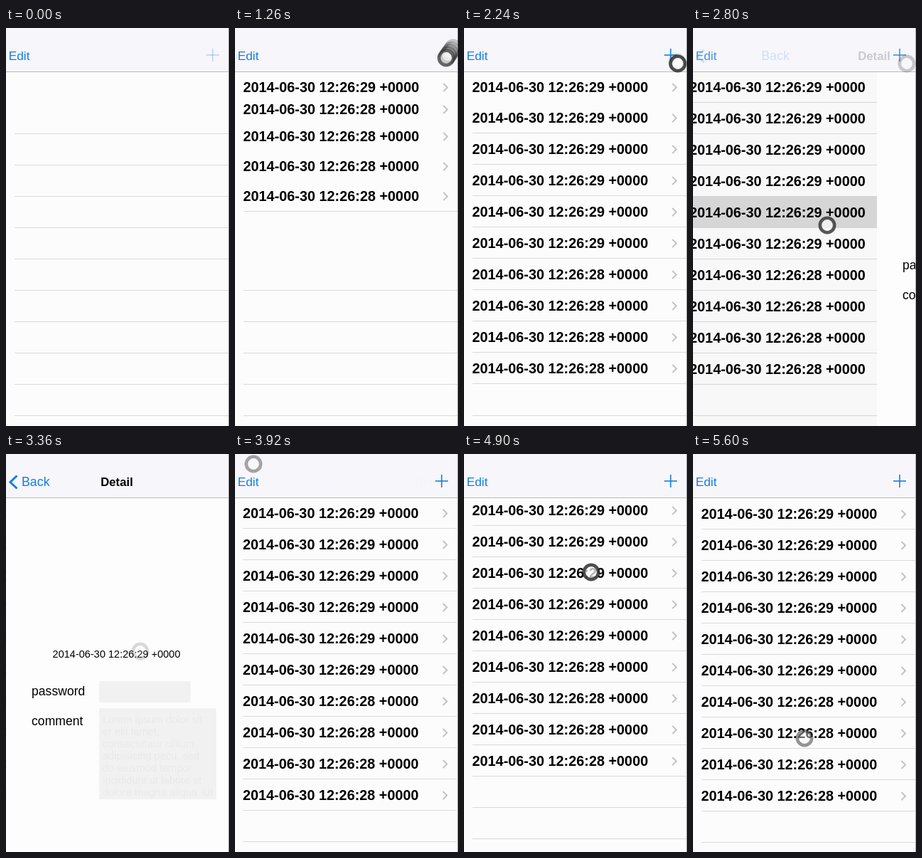
These frames come from a looping animation (314x559 px, 5.74 s). An HTML page with a canvas:

```html
<!DOCTYPE html>
<html lang="en">
<head>
<meta charset="utf-8">
<title>List and detail</title>
<style>
html, body { margin: 0; width: 100%; height: 100%; overflow: hidden; background: #fcfcfc; }
canvas { display: block; width: 314px; height: 559px; }
</style>
</head>
<body>
<canvas id="stage"></canvas>
<script>
const W = 314, H = 559, LOOP = 5740, STEP = 140;
const TOP = 61, ROW = 44, PICKED = 4;
const PUSH = 2760, POP = 3540, GRAB = 4340, DROP = 5300;
const BLUE = '#147ee0', PAPER = '#fcfcfc', BAR = '#f7f6fb', RULE = '#d9d9db';
const FONT = '"Liberation Sans", Arial, sans-serif';
const LOREM = ['Lorem ipsum dolor sit', 'er elit lamet,', 'consectetaur cillium',
  'adipisicing pecu, sed', 'do eiusmod tempor', 'incididunt ut labore et', 'dolore magna aliqua. Ut'];

const canvas = document.getElementById('stage');
const c = canvas.getContext('2d');
const dpr = window.devicePixelRatio || 1;
canvas.width = W * dpr;
canvas.height = H * dpr;

const clamp = v => Math.max(0, Math.min(1, v));
const mix = (a, b, p) => a + (b - a) * p;
const smooth = p => p * p * (3 - 2 * p);
const span = (t, a, b) => smooth(clamp((t - a) / (b - a)));
const spring = dt => dt <= 0 ? 0 : 1 - (1 + dt / 53) * Math.exp(-dt / 53);
const slide = dt => dt <= 0 ? 0 : dt > 600 ? 1 : 1 - Math.exp(-dt / 125);
const stamp = sec => `2014-06-30 12:26:${sec} +0000`;

// Ten quick taps on the plus button, each inserting one row.
const taps = Array.from({ length: 10 }, (_, i) => ({
  down: 690 + 105 * i + (i > 4 ? 60 : 0),
  x: i < 5 ? 307 - 2.4 * i : mix(297.4, 301, (i - 4) / 5),
  y: i < 5 ? 28 + 3.5 * i : mix(42, 50, (i - 4) / 5)
}));
taps.forEach((tap, i) => { tap.up = i < 9 ? tap.down + 40 : 2260; });

const touches = [
  ...taps,
  { x: 189, y: 277, down: 2600, up: PUSH },
  { x: 26, y: 14, down: 3440, up: POP }
];

function finger(t) {
  const up = span(t, 4460, 4900), down = span(t, 4940, DROP);
  return {
    x: 183 - 4 * up - 22 * down,
    y: 262.6 - 96.6 * up + 233 * down,
    down: GRAB, up: DROP
  };
}

function scrollAt(t) {
  if (t < GRAB) return 0;
  if (t > DROP) return Math.round(1 + 64 * Math.exp((DROP - t) / 45));
  const pull = 0.55 * (finger(t).y - 262.6);
  return Math.round(pull / (1 + Math.abs(pull) / 497));
}

function rect(x, y, w, h, color) {
  c.fillStyle = color;
  c.fillRect(x, y, w, h);
}

function text(str, x, y, size, color = '#000', weight = 'normal', align = 'left') {
  c.font = `${weight} ${size}px ${FONT}`;
  c.textAlign = align;
  c.fillStyle = color;
  c.fillText(str, x, y);
}

function stroke(points, color, width) {
  c.beginPath();
  points.forEach(([x, y], i) => i ? c.lineTo(x, y) : c.moveTo(x, y));
  c.strokeStyle = color;
  c.lineWidth = width;
  c.stroke();
}

function faded(alpha, draw) {
  if (alpha < 0.004) return;
  c.save();
  c.globalAlpha *= alpha;
  draw();
  c.restore();
}

function drawRow(y, sec, glow) {
  rect(0, y, W, ROW, PAPER);
  faded(glow, () => rect(0, y, W, ROW, '#d9d9d9'));
  rect(12, y + ROW - 1, W - 12, 1, RULE);
  text(stamp(sec), 11.5, y + 29, 19.85, '#000', 'bold');
  stroke([[293.5, y + 17], [299, y + 22.5], [293.5, y + 28]], '#c3c3c8', 2);
}

function drawList(t) {
  const count = taps.filter(tap => tap.down <= t).length;
  const moving = count && t - taps[count - 1].down < 420;
  const base = TOP + scrollAt(t);
  const glow = t < 2680 ? 0 : 1 - spring(t - POP);

  rect(0, 0, W, H, PAPER);
  for (let i = count + (moving || !count ? 1 : 0); i < 14; i++) {
    rect(12, base + ROW * (i + 1) - 1, W - 12, 1, RULE);
  }
  // Older rows slide down on top of the newer ones.
  let y = base;
  for (let i = count - 1; i >= 0; i--) {
    const picked = count === 10 && i === 9 - PICKED;
    drawRow(Math.round(y), i < 4 ? 28 : 29, picked ? glow : 0);
    y += ROW * slide(t - taps[i].down);
  }
}

function drawDetail() {
  rect(0, 0, W, H, '#fdfdfd');
  text(stamp(29), 155.5, 286, 14.55, '#000', 'normal', 'center');
  text('password', 36, 339, 17.6);
  text('comment', 36, 381, 17.6);
  rect(131, 319, 129, 30, '#f1f1f1');
  rect(131, 357, 165, 128, '#f1f1f1');
  LOREM.forEach((line, i) => text(line, 136, 378 + 17 * i, 14.7, '#e9e9e9'));
}

function drawBar(t, p) {
  rect(0, 0, W, TOP, BAR);
  rect(0, TOP, W, 1, '#b9b9bd');
  faded(1 - p, () => {
    text('Edit', 3.7, 45, 17.3, BLUE);
    faded(t < 690 ? 0.28 : t < 1760 ? 0.1 : 1, () => {
      stroke([[282, 38], [300, 38]], BLUE, 1.6);
      stroke([[291, 29], [291, 47]], BLUE, 1.6);
    });
  });
  faded(p, () => {
    stroke([[15.5, 30.5], [6, 39.5], [15.5, 48.5]], BLUE, 3);
    text('Back', 22 + 90 * (1 - p), 45, 17.8, BLUE);
    text('Detail', 156 + 120 * (1 - p), 45, 16.8, '#000', 'bold', 'center');
  });
}

function drawTouch(touch, t) {
  if (t < touch.down) return;
  faded(clamp(1 - (t - touch.up) / 750), () => {
    c.beginPath();
    c.arc(touch.x, touch.y, 10.2, 0, 7);
    c.fillStyle = 'rgba(250,250,250,0.72)';
    c.fill();
    c.strokeStyle = 'rgba(48,48,48,0.86)';
    c.lineWidth = 4.6;
    c.stroke();
  });
}

function draw(t) {
  const p = spring(t - PUSH) - spring(t - POP);
  c.setTransform(dpr, 0, 0, dpr, 0, 0);

  c.save();
  c.translate(-94 * p, 0);
  drawList(t);
  c.restore();
  if (p > 0.002) {
    faded(0.1 * p, () => rect(0, 0, W, H, '#000'));
    c.save();
    c.translate(W * (1 - p), 0);
    drawDetail();
    c.restore();
  }

  drawBar(t, p);
  rect(W - 1, 0, 1, H, '#b4b4b6');
  touches.forEach(touch => drawTouch(touch, t));
  drawTouch(finger(t), t);
}

const start = performance.now();
function tick() {
  const t = (performance.now() - start) % LOOP;
  draw(Math.floor(t / STEP) * STEP);
  requestAnimationFrame(tick);
}
tick();
</script>
</body>
</html>
```
